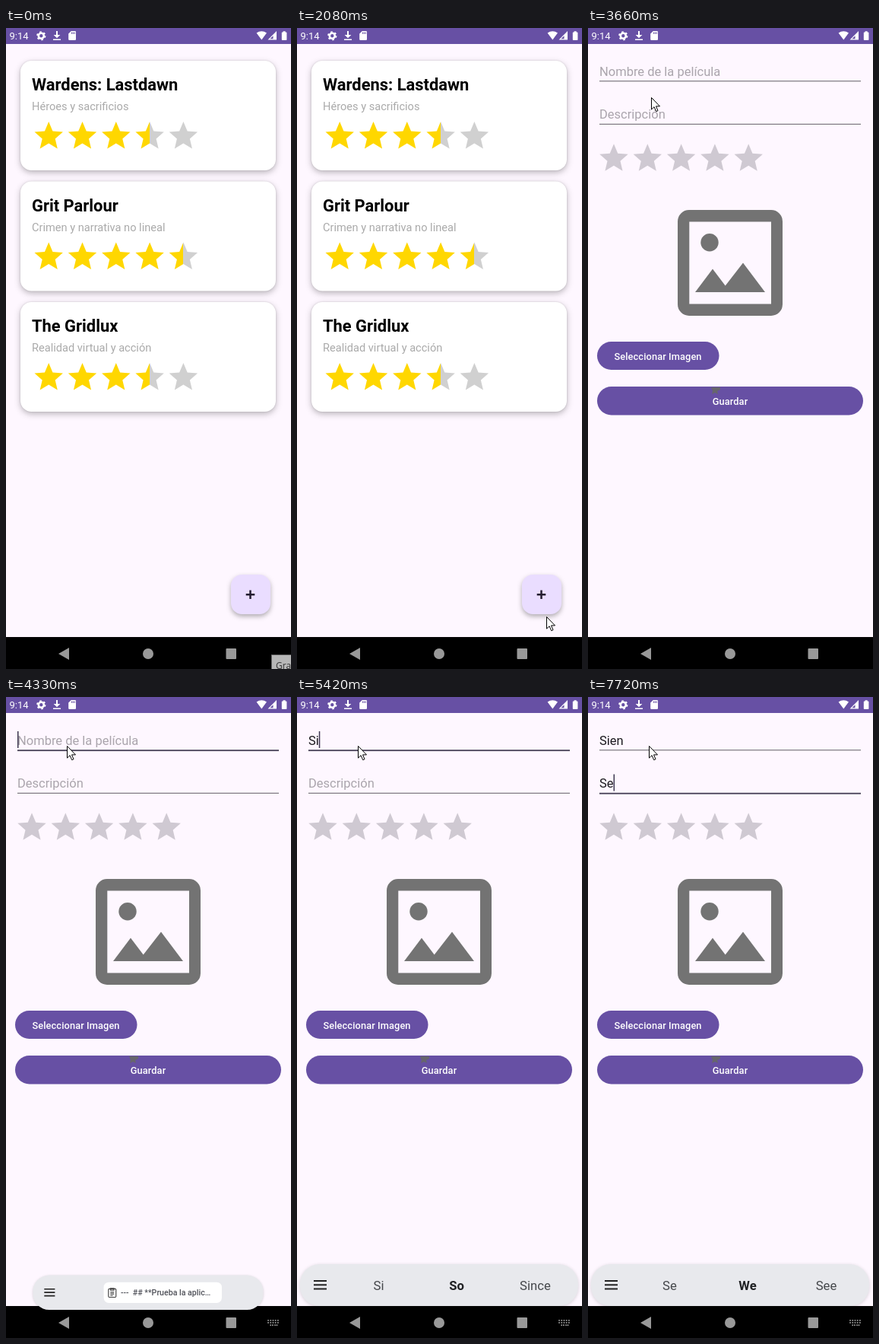
An HTML page that plays this animation: 375 px wide and 842 px high, repeating every 8000 ms.

```html
<!DOCTYPE html>
<html lang="es">
<head>
<meta charset="utf-8">
<title>Lista de películas</title>
<style>
  html, body { margin: 0; width: 100%; height: 100%; overflow: hidden; background: #fef7ff; }
  svg { display: block; width: 375px; height: 842px; font-family: Roboto, sans-serif; }
  text { white-space: pre; }
  .card { fill: #fff; filter: drop-shadow(0 3px 4px rgba(0,0,0,.24)) drop-shadow(0 0 1px rgba(0,0,0,.14)); }
  .title { font-weight: 700; font-size: 21.9px; }
  .sub { font-size: 14.6px; fill: #aaa; }
  .button { font-weight: 500; font-size: 12.8px; letter-spacing: .1px; fill: #fff; text-anchor: middle; }
  .field { font-size: 16.5px; fill: #1d1b20; }
  .hint { font-size: 16.5px; fill: #aaa5ac; }
  .word { font-size: 16.7px; fill: #46484c; text-anchor: middle; }
  .word.best { font-weight: 700; fill: #202124; }
  #fab { filter: drop-shadow(0 3px 3px rgba(0,0,0,.3)); }
  #pill { fill: #e8e9ed; filter: drop-shadow(0 1px 2px rgba(0,0,0,.16)); }
</style>
</head>
<body>
<svg viewBox="0 0 375 842">
  <defs>
    <path id="star" transform="scale(1.87) translate(-12 -2)" d="M12 17.27 18.18 21l-1.64-7.03L22 9.24l-7.19-.61L12 2 9.19 8.63 2 9.24l5.46 4.73L5.82 21z"/>
    <linearGradient id="half"><stop offset=".5" stop-color="#ffd700"/><stop offset=".5" stop-color="#d0d0d0"/></linearGradient>
    <clipPath id="fabShape"><rect x="296" y="718" width="52" height="52" rx="14.6"/></clipPath>
  </defs>
  <rect width="375" height="842" fill="#fef7ff"/>

  <g id="list">
    <g id="cards"></g>
    <rect id="fab" x="296" y="718" width="52" height="52" rx="14.6" fill="#eaddff"/>
    <circle id="ripple" cx="322" cy="745.5" fill="#d4c5ec" clip-path="url(#fabShape)"/>
    <path id="plus" d="M321.5 738.5v11.6M315.7 744.3h11.6" stroke-width="2.5"/>
  </g>

  <g id="form">
    <rect y="21" width="375" height="779" fill="#fef7ff"/>
    <text id="hint0" class="hint" x="15" y="63">Nombre de la película</text>
    <text id="hint1" class="hint" x="15" y="119">Descripción</text>
    <text id="text0" class="field" x="15" y="63"></text>
    <text id="text1" class="field" x="15" y="119"></text>
    <rect id="line0" x="15" y="69.3" width="344"/>
    <rect id="line1" x="15" y="125.8" width="344"/>
    <rect id="caret" width="1.5" height="22" fill="#3d3650"/>
    <g id="rating"></g>
    <g fill="#737373">
      <path fill-rule="evenodd" d="M133 239h108a15 15 0 0 1 15 15v109a15 15 0 0 1-15 15H133a15 15 0 0 1-15-15V254a15 15 0 0 1 15-15zM133.3 254.6V362.4H241V254.6z"/>
      <circle cx="160" cy="281.7" r="11.7"/>
      <path d="M141 347 164 316.5 180.7 338.6 204 308.5 233 347z"/>
    </g>
    <rect x="12" y="412" width="160.5" height="37" rx="18.5" fill="#6750a4"/>
    <text class="button" x="92" y="435.5">Seleccionar Imagen</text>
    <rect x="12" y="471" width="350" height="37.5" rx="18.7" fill="#6750a4"/>
    <path fill="#67656d" d="M162 472h12v3l-4 2 1 4-4-2-4 2 1-4z"/>
    <text class="button" x="187" y="494.7">Guardar</text>
  </g>

  <g id="status" fill="#fff">
    <rect width="375" height="21" fill="#6750a4"/>
    <text x="4.5" y="15" font-size="13">9:14</text>
    <g fill="none" stroke="#fff">
      <circle cx="46.3" cy="10.3" r="3.5" stroke-width="2.6"/>
      <circle cx="46.3" cy="10.3" r="5.2" stroke-width="1.9" stroke-dasharray="2.45 2.995"/>
    </g>
    <path d="M66 4h2v5h3.4L67 13.2 62.6 9H66zM62 14.6h10v1.4H62z"/>
    <path fill-rule="evenodd" d="M85.8 4h5q1.2 0 1.2 1.2v9.6q0 1.2-1.2 1.2h-7.4q-1.2 0-1.2-1.2V7.6zM86 5.4v2.4h1.1V5.4zm1.9 0v2.4H89V5.4zm1.9 0v2.4h1.1V5.4z"/>
    <path d="M336.3 15.5 329.6 6.6q6.7-4.6 13.4 0z"/>
    <path fill-rule="evenodd" d="M356 4v11.5h-11.5zM351.5 10.2 347.4 14.3h4.1z"/>
    <path d="M364.6 4.2h3v1.2h1q.8 0 .8.8v9q0 .8-.8.8h-5q-.8 0-.8-.8v-9q0-.8.8-.8h1z"/>
  </g>

  <g id="nav" fill="#999">
    <rect y="800" width="375" height="42" fill="#000"/>
    <path d="M69 822 83 814v16z"/>
    <circle cx="187" cy="822" r="7"/>
    <rect x="289.5" y="815" width="13.5" height="14" rx="1"/>
    <path id="keys" stroke="#999" stroke-width="1.7" stroke-dasharray="1.7 1.5" d="M344.2 818.8h14.6M344.2 821.9h14.6M347.4 825.2h1.6M350 825.2h4.8M355.6 825.2h1.7"/>
  </g>

  <g id="bar">
    <rect id="pill" x="4" y="745" width="366" height="55" rx="26"/>
    <path d="M22 767h17M22 772.3h17M22 777.6h17" stroke="#222" stroke-width="2"/>
    <g id="chip">
      <rect x="116.5" y="756" width="187.5" height="33" rx="8" fill="#fff"/>
      <g fill="none" stroke="#444" stroke-width="1.4">
        <rect x="124" y="766.5" width="12" height="13.5" rx="1.5"/>
        <path d="M127.3 766v2.6h5.4V766zM127 772h6M127 774.6h6M127 777.2h4"/>
      </g>
      <text x="143.5" y="777.3" font-size="12.8" font-weight="500" fill="#50525a">---  ## **Prueba la aplic…</text>
    </g>
    <g id="words">
      <text class="word" x="107.5" y="778.5"></text>
      <text class="word best" x="210" y="778.5"></text>
      <text class="word" x="313.5" y="778.5"></text>
    </g>
  </g>

  <g id="tip">
    <rect x="349.5" y="823.5" width="60" height="24" fill="#e6e6e6" stroke="#8a8a8a"/>
    <text id="tipText" x="355" y="842" font-size="12" fill="#444" style="font-family: 'Open Sans', sans-serif"></text>
  </g>
  <circle id="click" r="12" fill="#ff0" fill-opacity=".47"/>
  <path id="cursor" fill="#fff" stroke="#000" stroke-linejoin="round" d="M.5.5v15.6l3.6-3.4 2.6 6 2.3-1-2.5-5.8h5z"/>
</svg>
<script>
const LOOP = 8000;
const $ = id => document.getElementById(id);
const clamp = v => Math.max(0, Math.min(1, v));
const ramp = (t, a, b) => clamp((t - a) / (b - a));
const smooth = p => p * p * (3 - 2 * p);
const within = (t, spans) => spans.some(([a, b]) => t >= a && t < b);
const show = (id, opacity) => $(id).setAttribute("opacity", +opacity);
const set = (id, attrs) => { for (const k in attrs) $(id).setAttribute(k, attrs[k]); };

// Last value whose time has come.
const latest = (t, steps) => steps.reduce((v, [at, next]) => t >= at ? next : v, steps[0][1]);

function stars(x, y, rating, empty) {
  return [0, 1, 2, 3, 4].map(i => {
    const left = rating - i;
    const fill = left >= 1 ? "#ffd700" : left > 0 ? "url(#half)" : empty;
    return `<g transform="translate(${x + i * 44.3} ${y})"><use href="#star" fill="${fill}"/></g>`;
  }).join("");
}

const films = [
  ["Wardens: Lastdawn", "Héroes y sacrificios", 3.5],
  ["Grit Parlour", "Crimen y narrativa no lineal", 4.5],
  ["The Gridlux", "Realidad virtual y acción", 3.5]
];
$("cards").innerHTML = films.map(([title, sub, rating], i) =>
  `<g transform="translate(0 ${i * 158.5})">
    <rect class="card" x="19" y="43" width="336" height="144" rx="14.6"/>
    <text class="title" x="34" y="82">${title}</text>
    <text class="sub" x="34" y="108">${sub}</text>
    ${stars(56.2, 123, rating, "#d0d0d0")}
  </g>`).join("");
$("rating").innerHTML = stars(34, 152.3, 0, "#cfc9d2");

const path = [
  [1340, 342, 836], [1480, 338, 812], [1680, 328, 773], [2500, 328, 773], [2690, 322, 749],
  [3340, 322, 749], [3480, 215, 400], [3590, 105, 140], [3660, 83, 91], [4040, 80, 64]
];
const clicks = [[1950, 2080], [2690, 2760], [4060, 4190]];
const caretOn = [[4190, 4690], [5090, 6230], [6500, 7030], [7380, LOOP]];
const typed = [
  [[0, ""], [5090, "S"], [5350, "Si"], [5550, "Sie"], [5700, "Sien"]],
  [[0, ""], [7380, "S"], [7650, "Se"]]
];
const guesses = [
  [0, null], [5150, ["S", "So", "She"]], [5420, ["Si", "So", "Since"]], [5770, ["Sien", "Sign", "Sent"]],
  [6560, null], [7450, ["S", "So", "She"]], [7720, ["Se", "We", "See"]]
];

function pointer(t) {
  const next = path.findIndex(k => k[0] > t);
  if (next < 0) return path.at(-1).slice(1);
  const [a, x0, y0] = path[Math.max(0, next - 1)], [b, x1, y1] = path[next];
  const p = ramp(t, a, b);
  return [x0 + (x1 - x0) * p, y0 + (y1 - y0) * p];
}

function drawForm(t) {
  const focus = t < 4190 ? -1 : t < 6500 ? 0 : 1;
  typed.forEach((steps, i) => {
    const value = latest(t, steps);
    $("text" + i).textContent = value;
    show("hint" + i, !value);
    const active = focus === i;
    set("line" + i, { height: active ? 1.8 : 1, fill: active ? "#453f55" : "#625e65" });
  });
  show("caret", within(t, caretOn));
  if (focus >= 0) {
    set("caret", { x: 15 + $("text" + focus).getComputedTextLength(), y: focus ? 101.5 : 45 });
  }
}

function drawKeyboardBar(t) {
  show("keys", t >= 4190);
  show("bar", t >= 4260);
  const p = smooth(ramp(t, 4260, 4610));
  const scale = .808 + .192 * p, y = 772.5 + 11 * (1 - p);
  set("bar", { transform: `translate(187 ${y}) scale(${scale}) translate(-187 -772.5)` });
  const words = latest(t, guesses);
  show("chip", !words);
  show("words", !!words);
  if (words) [...$("words").children].forEach((el, i) => el.textContent = words[i]);
}

function draw(t) {
  const pressed = t >= 2690;
  set("ripple", { r: 26 * smooth(ramp(t, 2670, 2820)) });
  set("plus", { stroke: pressed ? "#21005d" : "#241d30" });
  show("form", smooth(ramp(t, 2980, 3320)));
  drawForm(t);
  drawKeyboardBar(t);

  const early = t < 1000;
  $("tipText").textContent = early ? "Grabar" : "Parar";
  show("tip", early ? .8 * (1 - ramp(t, 0, 280)) : t >= 1340 ? 1 - ramp(t, 1400, 1610) : 0);

  const [x, y] = pointer(t);
  set("cursor", { transform: `translate(${x} ${y})` });
  show("cursor", t >= 1340);
  set("click", { cx: x, cy: y });
  show("click", within(t, clicks));
}

function tick() {
  draw(performance.now() % LOOP);
  requestAnimationFrame(tick);
}
tick();
</script>
</body>
</html>
```
